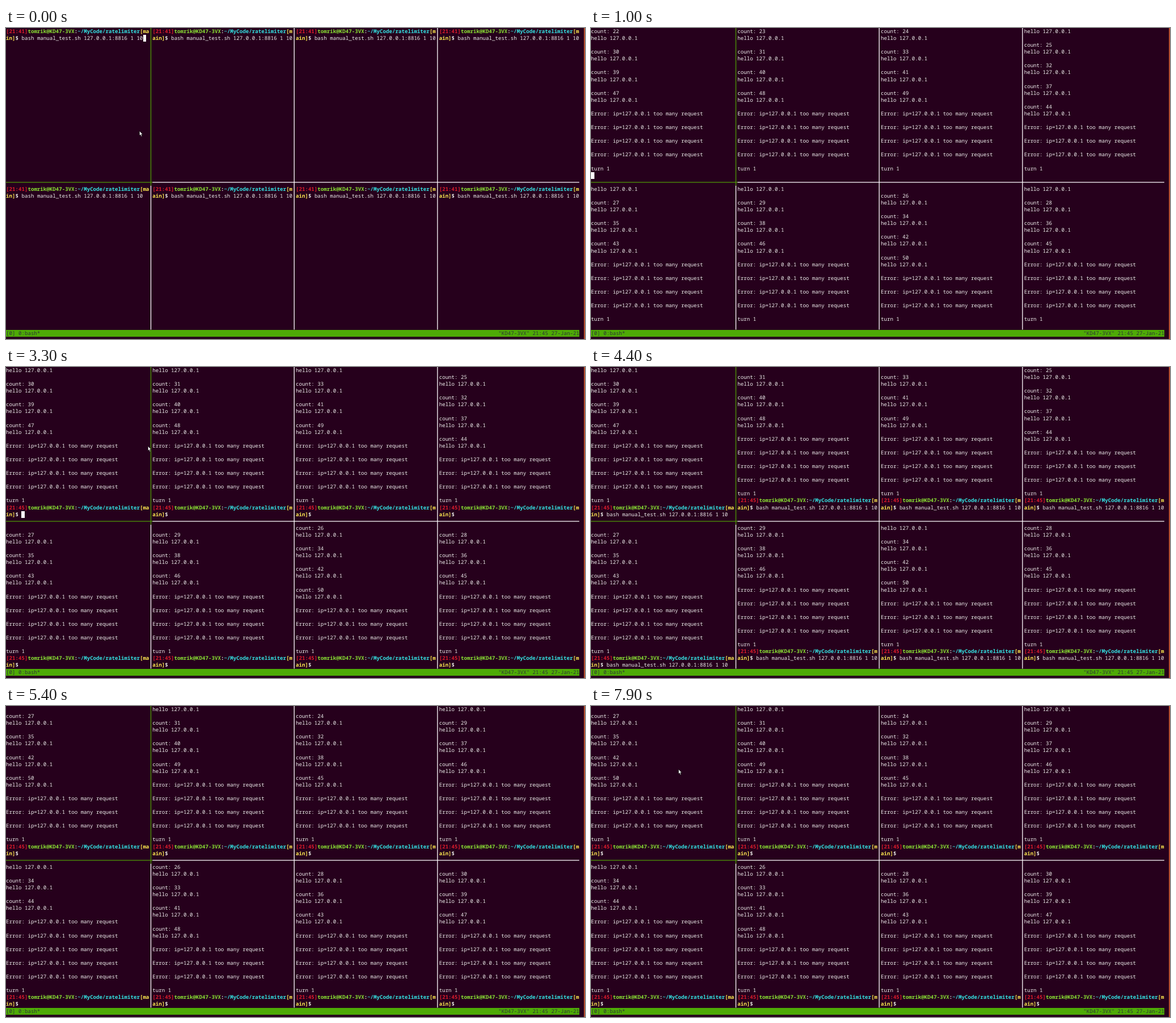
Recreate the animation shown at these times as an HTML page. Size 1021 by 548 pixels, loop 8000 ms.

```html
<!DOCTYPE html>
<html lang="en">
<head>
<meta charset="utf-8">
<title>Rate limiter test</title>
<style>
  html, body { margin: 0; width: 100%; height: 100%; overflow: hidden; background: #26001c; }
  #stage { position: relative; width: 1021px; height: 548px; overflow: hidden; background: #26001c; }
  #stage > * { position: absolute; }
  .pane, .bar {
    font: 9.157px/12.08px "Noto Sans Mono", monospace;
    font-variant-ligatures: none;
    text-rendering: geometricPrecision;
    white-space: pre;
    color: #eeeeec;
  }
  .bar { left: 0; top: 531.5px; width: 1010.9px; height: 12.1px; background: #4eaa06; color: #2e3436; }
  .bar span { position: absolute; right: 0; }
  .scroll { left: 1019px; top: 0; width: 2px; height: 548px; background: #b34c2c; }
  #caret { width: 5.5px; height: 12.08px; background: #fff; }
  svg { left: 0; top: 0; }
  b { font-weight: 700; }
  .r { color: #dc1c2c; }
  .g { color: #8ae234; }
  .c { color: #34e2e2; }
  .y { color: #fce94f; }
</style>
</head>
<body>
<div id="stage">
  <div class="bar">[0] 0:bash*<span>"KD47-3VX" 21:45 27-Jan-21</span></div>
  <div class="scroll"></div>
  <div id="caret"></div>
  <svg width="1021" height="548" fill="none" stroke-width="1.3">
    <path stroke="#fff" d="M258.2 271.8H1010.9M255.5 277.8V531.5M508.2 0V531.5M760.9 0V531.5"/>
    <path stroke="#4e9a06" d="M255.5 0V277.8M0 271.8H258.2"/>
    <path id="mouse" fill="#fff" stroke="#000" stroke-width=".6"
      d="M.4 .4V8.6L2.2 7L3.5 10.2L4.9 9.6L3.6 6.5H6Z"/>
  </svg>
</div>
<script>
const CELL = 5.494, ROW = 12.08, LOOP = 8000, STEP = 100;
const REQUESTS = 10, LIMIT = 50, PANES = 8;
const RETYPE = 3800, PROMPT_DELAY = 260, BLINK = 575;
const COMMAND = 'bash manual_test.sh 127.0.0.1:8816 1 10';
const stage = document.getElementById('stage');
const caret = document.getElementById('caret');
const mouse = document.getElementById('mouse');

// Per pane: requests granted, order of the last grant, requests finished after `span` ms
const runs = [
  { start: 500, span: 300,
    granted: [6, 6, 6, 7, 6, 6, 7, 6],
    place: [4, 5, 6, 1, 0, 3, 7, 2],
    pace: [8, 9, 8, 11, 9, 8, 9, 9] },
  { start: 4800, span: 200,
    granted: [7, 6, 7, 6, 5, 7, 6, 6],
    place: [7, 6, 2, 3, 1, 5, 0, 4],
    pace: [8, 7, 8.5, 7, 7, 8.5, 7, 7] }
];

// Each pane asks at an even rate; the shared counter numbers the grants in order of time
function countUp({ granted, place }) {
  const counts = granted.map(() => []);
  granted
    .flatMap((n, pane) => Array.from({ length: n }, (_, j) => ({
      pane, at: (LIMIT - PANES + 1 + place[pane]) * (j + 0.4) / (n - 0.6)
    })))
    .sort((a, b) => a.at - b.at)
    .forEach(({ pane }, i) => counts[pane].push(i + 1));
  return counts;
}
for (const run of runs) run.counts = countUp(run);

const blinkStarts = [0, 500, RETYPE, 4800, 6100];
const mouseOn = [[0, 500], [2800, RETYPE], [6700, LOOP]];
const mousePath = [
  [2800, 235, 181], [3200, 255, 126], [3500, 240, 165], [6700, 240, 165],
  [7300, 180, 172], [7500, 180, 172], [7700, 154, 127], [7900, 154, 111]
];

const bold = (cls, text) => `<b class="${cls}">${text}</b>`;

function prompt(time, cols) {
  const cut = cols - 43, tag = '[main]';
  return [
    bold('r', `[${time}]`) + bold('g', 'tomrik@KD47-3VX') + '<b>:</b>' +
      bold('c', '~/MyCode/ratelimiter') + bold('y', tag.slice(0, cut)),
    bold('y', tag.slice(cut)) + '<b>$</b> '
  ];
}

// Half a request means its trailing blank line is still to come
function output(counts, done) {
  const lines = [];
  for (let i = 0; i < Math.min(REQUESTS, Math.ceil(done)); i++) {
    if (i < counts.length) lines.push('count: ' + counts[i], 'hello 127.0.0.1', '');
    else lines.push('Error: ip=127.0.0.1 too many request', '');
  }
  if (done >= REQUESTS) lines.push('turn 1');
  else if (done % 1) lines.pop();
  return lines;
}

// Screen lines of a pane; the last one holds its caret
function screen({ index, cols, rows }, t) {
  const lines = prompt('21:41', cols);
  let typed = true;
  for (const run of runs) {
    if (typed) lines[lines.length - 1] += COMMAND;
    if (t < run.start) {
      if (typed && cols === 45) lines.push('');
      break;
    }
    const elapsed = t - run.start, pace = run.pace[index] / run.span;
    lines.push(...output(run.counts[index], Math.floor(2 * pace * elapsed) / 2));
    if (elapsed < REQUESTS / pace + PROMPT_DELAY) {
      lines.push('');
      break;
    }
    lines.push(...prompt('21:45', cols));
    typed = t >= RETYPE;
  }
  return lines.slice(-rows);
}

const panes = Array.from({ length: PANES }, (_, index) => {
  const c = index % 4, low = index > 3;
  const el = document.createElement('div');
  el.className = 'pane';
  el.style.left = (c ? 47 + (c - 1) * 46 : 0) * CELL + 'px';
  el.style.top = (low ? 23 * ROW : 0) + 'px';
  stage.insertBefore(el, caret);
  return { el, index, cols: c ? 45 : 46, rows: low ? 21 : 22, html: null };
});

function mouseAt(t) {
  const next = mousePath.findIndex(p => p[0] > t);
  if (next < 1) return mousePath.at(next).slice(1);
  const [t0, x0, y0] = mousePath[next - 1], [t1, x1, y1] = mousePath[next];
  const k = (t - t0) / (t1 - t0);
  return [x0 + (x1 - x0) * k, y0 + (y1 - y0) * k];
}

function caretVisible(t) {
  const since = t - blinkStarts.filter(s => s <= t).pop();
  return Math.floor(since / BLINK) % 2 === 0;
}

const show = (el, on) => { el.style.visibility = on ? 'visible' : 'hidden'; };

function draw(t) {
  for (const pane of panes) {
    const lines = screen(pane, t), html = lines.join('\n');
    if (html !== pane.html) pane.el.innerHTML = pane.html = html;
    if (pane.index === 0) {
      const col = lines[lines.length - 1].replace(/<[^>]*>/g, '').length;
      caret.style.left = col * CELL + 'px';
      caret.style.top = (lines.length - 1) * ROW + 'px';
    }
  }
  show(caret, caretVisible(t));
  show(mouse, mouseOn.some(([a, b]) => t >= a && t < b));
  mouse.setAttribute('transform', `translate(${mouseAt(t)})`);
}

const start = performance.now();
let last = -1;
function tick() {
  const t = Math.floor(((performance.now() - start) % LOOP) / STEP) * STEP;
  if (t !== last) draw(last = t);
  requestAnimationFrame(tick);
}
tick();
</script>
</body>
</html>
```
